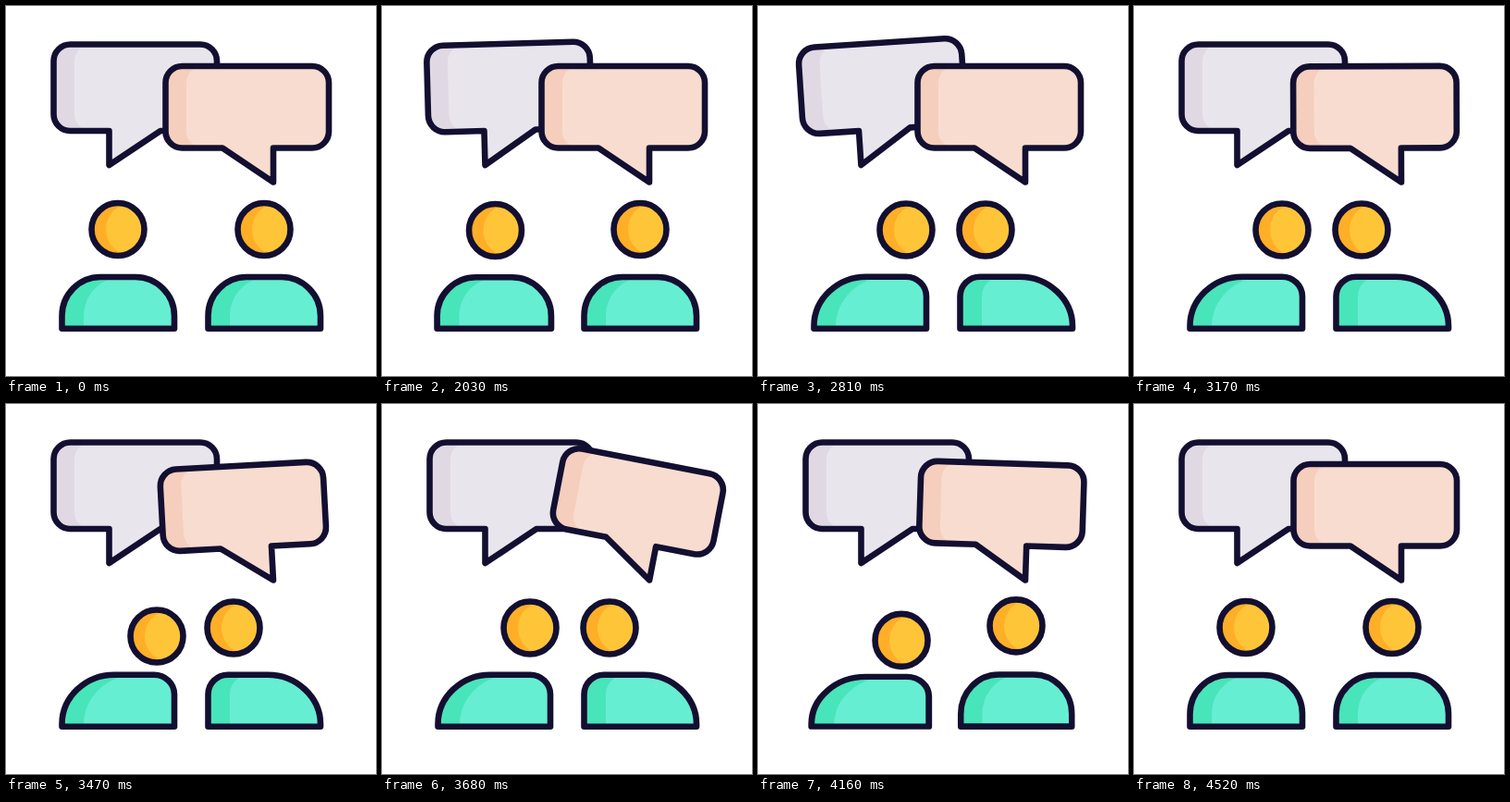
An HTML page without scripts for the animation above (4550 ms loop, 400x400 px).

```html
<!DOCTYPE html>
<html lang="en">
<head>
<meta charset="utf-8">
<title>Conversation</title>
<style>
html, body { margin: 0; width: 100%; height: 100%; overflow: hidden; background: #fff; }
svg { display: block; width: 100%; height: 100%; }
.line { fill: none; stroke: #120f31; stroke-width: 6.6; stroke-linejoin: round; }

.bubble, .head, .body, .torso {
  animation: 4.55s ease-in-out infinite;
}
.torso { d: path("M60.5 348.7V335C60.5 312 79 293 102 293H140C163 293 182 312 182 335V348.7Z"); }
.body { transform-origin: 121px 348.7px; }
.left .head { animation-name: left-head; }
.left .body { animation-name: left-squash; }
.left .torso { animation-name: left-turn; }
.right .head { animation-name: right-head; }
.right .body { animation-name: right-squash; }
.right .torso { animation-name: right-turn; }
.bubble.first { transform-origin: 111.5px 172.5px; animation-name: first-talk; }
.bubble.second { transform-origin: 289px 191px; animation-name: second-talk; }

@keyframes first-talk {
  0%, 44.6% { rotate: 0deg; }
  44.62% { rotate: -1.6deg; }
  48.1% { rotate: -20deg; animation-timing-function: ease-in; }
  51.21% { rotate: -7.4deg; animation-timing-function: ease-out; }
  53.4% { rotate: 0deg; }
  56% { rotate: -8.6deg; }
  59.1% { rotate: -1deg; }
  61.76% { rotate: -3.8deg; }
  68.3%, 100% { rotate: 0deg; }
}
@keyframes second-talk {
  0%, 69% { rotate: 0deg; }
  73.2% { rotate: -4deg; }
  76.26% { rotate: -3.1deg; }
  79.1% { rotate: 14.5deg; }
  85.3% { rotate: -5.6deg; }
  86.15% { rotate: -5deg; }
  92.1% { rotate: 2deg; }
  97.8%, 100% { rotate: 0deg; }
}
@keyframes left-head {
  0%, 44.6% { translate: 0 0; }
  44.62% { translate: 1.5px 1px; }
  46.6% { translate: 8px 13px; animation-timing-function: linear; }
  49.2% { translate: 32px 6px; animation-timing-function: ease-out; }
  51.21% { translate: 39px -1px; }
  53.8%, 72.5% { translate: 39px .5px; }
  76.26% { translate: 42px 9.5px; }
  80%, 89.4% { translate: 39px .5px; }
  91.6% { translate: 34px 14px; animation-timing-function: linear; }
  94.3% { translate: 8px 4px; animation-timing-function: ease-out; }
  96% { translate: 0 -2px; }
  98.2%, 100% { translate: 0 0; }
}
@keyframes right-head {
  0%, 44.8% { translate: 0 0; }
  47% { translate: -4px 13px; animation-timing-function: linear; }
  49.4% { translate: -22px 6px; animation-timing-function: ease-out; }
  51.21% { translate: -31px -1px; }
  53.4%, 84% { translate: -33px .5px; }
  86.15% { translate: -29px 13.5px; animation-timing-function: linear; }
  88.8% { translate: -8px 5px; animation-timing-function: ease-out; }
  90.8% { translate: 0 -2px; }
  93%, 100% { translate: 0 0; }
}
@keyframes left-squash {
  0%, 44.6% { scale: 1 1; }
  44.62% { scale: 1.015 .995; }
  46.6% { scale: 1.045 .96; }
  51.21% { scale: .985 1.01; }
  53.8%, 89.4% { scale: 1 1; }
  91.6% { scale: 1.045 .96; }
  96% { scale: .985 1.01; }
  98.2%, 100% { scale: 1 1; }
}
@keyframes right-squash {
  0%, 44.8% { scale: 1 1; }
  47% { scale: 1.045 .96; }
  51.21% { scale: .985 1.01; }
  53.4%, 84% { scale: 1 1; }
  86.15% { scale: 1.03 .965; }
  90.8% { scale: .985 1.01; }
  93%, 100% { scale: 1 1; }
}
@keyframes left-turn {
  0%, 45.5%, 95.6%, 100% { d: path("M60.5 348.7V335C60.5 312 79 293 102 293H140C163 293 182 312 182 335V348.7Z"); }
  51%, 90.8% { d: path("M60.5 348.7V346C60.5 317 86 292.7 117 292.7H160C172 292.7 182 302 182 314V348.7Z"); }
}
@keyframes right-turn {
  0%, 45.9%, 90.5%, 100% { d: path("M60.5 348.7V335C60.5 312 79 293 102 293H140C163 293 182 312 182 335V348.7Z"); }
  51%, 86.15% { d: path("M60.5 348.7V314C60.5 302 70 292.7 82 292.7H125C156 292.7 182 317 182 346V348.7Z"); }
}
</style>
</head>
<body>
<svg viewBox="0 0 400 400">
  <defs>
    <clipPath id="face"><circle cx="121" cy="241.5" r="28.5"/></clipPath>
    <clipPath id="left-clip" class="left"><path class="torso"/></clipPath>
    <clipPath id="right-clip" class="right"><path class="torso"/></clipPath>
    <g id="head">
      <circle cx="121" cy="241.5" r="28.5" fill="#ffae27"/>
      <g clip-path="url(#face)"><circle cx="136.5" cy="241.5" r="28.5" fill="#ffc538"/></g>
      <circle class="line" cx="121" cy="241.5" r="28.5"/>
    </g>
    <path id="first-shape" d="M69.5 41.5H210a18 18 0 0 1 18 18V117a18 18 0 0 1-18 18H167L111.5 172V135H69.5a18 18 0 0 1-18-18V59.5a18 18 0 0 1 18-18Z"/>
    <path id="second-shape" d="M190.5 65H331a18 18 0 0 1 18 18V135.5a18 18 0 0 1-18 18H289V190.5L234 153.5H190.5a18 18 0 0 1-18-18V83a18 18 0 0 1 18-18Z"/>
  </defs>

  <g class="bubble first">
    <use href="#first-shape" fill="#e9e5ed"/>
    <path fill="#e0d9e3" d="M92 41.5H69.5a18 18 0 0 0-18 18V117a18 18 0 0 0 18 18H92a18 18 0 0 1-18-18V59.5a18 18 0 0 1 18-18Z"/>
    <use href="#first-shape" class="line"/>
  </g>
  <g class="bubble second">
    <use href="#second-shape" fill="#f8dcd0"/>
    <path fill="#f6cebd" d="M213 65H190.5a18 18 0 0 0-18 18V135.5a18 18 0 0 0 18 18H213a18 18 0 0 1-18-18V83a18 18 0 0 1 18-18Z"/>
    <use href="#second-shape" class="line"/>
  </g>

  <g class="left">
    <g class="body">
      <path class="torso" fill="#48e4ba"/>
      <g clip-path="url(#left-clip)"><path class="torso" fill="#66eed2" transform="translate(23.5)"/></g>
      <path class="torso line"/>
    </g>
    <g class="head"><use href="#head"/></g>
  </g>
  <g class="right" transform="translate(158)">
    <g class="body">
      <path class="torso" fill="#48e4ba"/>
      <g clip-path="url(#right-clip)"><path class="torso" fill="#66eed2" transform="translate(23.5)"/></g>
      <path class="torso line"/>
    </g>
    <g class="head"><use href="#head"/></g>
  </g>
</svg>
</body>
</html>
```
